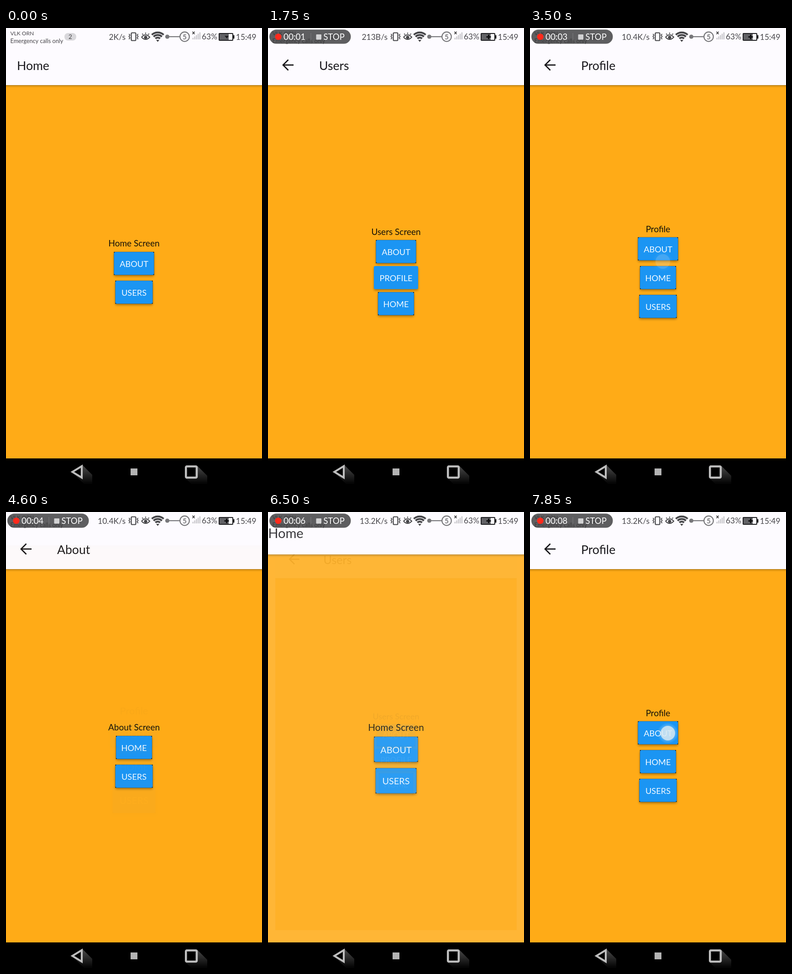
Animation, 561 px wide and 998 px high, one loop 8000 ms. Source, as an HTML page with a canvas:

```html
<!DOCTYPE html>
<html lang="en">
<head>
<meta charset="utf-8">
<title>Stack navigation</title>
<style>
html, body { margin: 0; width: 100%; height: 100%; overflow: hidden; background: #000; }
canvas { display: block; width: 561px; height: 998px; }
</style>
</head>
<body>
<canvas id="stage" width="561" height="998"></canvas>
<script>
const W = 561, H = 998, NAV = 942, LOOP = 8000;
const CX = 280.5, CY = 471.5;
const FONT = 'Lato, "Open Sans", sans-serif';
const ctx = document.getElementById('stage').getContext('2d');
const layerCanvas = document.createElement('canvas');
layerCanvas.width = W;
layerCanvas.height = NAV;
const layer = layerCanvas.getContext('2d');

// Buttons: label, top, width, plain corners
const SCREENS = {
  Home: { back: false, text: 'Home Screen', y: 472, buttons: [['ABOUT', 490, 88], ['USERS', 553, 82]] },
  Users: { back: true, text: 'Users Screen', y: 447, buttons: [['ABOUT', 464, 88], ['PROFILE', 521, 97, true], ['HOME', 578, 79]] },
  Profile: { back: true, text: 'Profile', y: 440.5, buttons: [['ABOUT', 458, 88], ['HOME', 521, 79], ['USERS', 584, 82]] },
  About: { back: true, text: 'About Screen', y: 472, buttons: [['HOME', 490, 79], ['USERS', 553, 82]] }
};

const MOVE = 400;
const MOVES = [
  { at: 630, from: 'Home', to: 'Users' },
  { at: 2208, from: 'Users', to: 'Profile' },
  { at: 4205, from: 'Profile', to: 'About' },
  { at: 5130, from: 'About', to: 'Home', pop: true },
  { at: 6405, from: 'Home', to: 'Users' },
  { at: 7300, from: 'Users', to: 'Profile' }
];

// Touches: start, end, x, y, then optional drag target
const TAPS = [
  [50, 500, 296, 581],
  [1950, 2300, 313, 546],
  [3150, 3530, 302, 486, 291, 511],
  [3950, 4310, 301, 486],
  [4750, 5130, 296, 517],
  [6000, 6410, 296, 581],
  [6950, 7310, 313, 546],
  [7800, 8200, 302, 484]
];

const SECONDS = [950, 1950, 3150, 3950, 4750, 5500, 6800, 7800];
const BLINKS = [1250, 1750, 2300, 2850, 3750, 4250, 5250, 5800, 6800, 7800];
const SPEEDS = [[0, '2K/s'], [300, '213B/s'], [2800, '10.4K/s'], [6000, '13.2K/s']];

const passed = (list, t) => list.filter(v => t >= v).length;

function ease(x) {
  if (x <= 0) return 0;
  if (x >= 1) return 1;
  let lo = 0, hi = 1;
  for (let i = 0; i < 24; i++) {
    const u = (lo + hi) / 2, v = 1 - u;
    if (3 * u * v * v * 0.35 + u * u * u < x) lo = u; else hi = u;
  }
  const v = 1 - lo;
  return 3 * lo * v * v * 0.45 + 3 * lo * lo * v + lo * lo * lo;
}

function text(c, str, x, y, size, color, align = 'left', weight = 400) {
  c.font = `${weight} ${size}px ${FONT}`;
  c.fillStyle = color;
  c.textAlign = align;
  c.fillText(str, x, y);
}

function box(c, x, y, w, h, r, color) {
  c.fillStyle = color;
  c.beginPath();
  c.roundRect(x, y, w, h, r);
  c.fill();
}

function disc(c, x, y, r, color) {
  c.fillStyle = color;
  c.beginPath();
  c.arc(x, y, r, 0, Math.PI * 2);
  c.fill();
}

function line(c, points, width, color, close) {
  c.strokeStyle = color;
  c.lineWidth = width;
  c.beginPath();
  points.forEach(([x, y], i) => i ? c.lineTo(x, y) : c.moveTo(x, y));
  if (close) c.closePath();
  c.stroke();
}

function fillPath(c, points, style) {
  c.fillStyle = style;
  c.beginPath();
  points.forEach(([x, y]) => c.lineTo(x, y));
  c.closePath();
  c.fill();
}

function button(c, [label, y, w, plain]) {
  const x = CX - w / 2, h = 50.5;
  c.save();
  c.shadowColor = 'rgba(70,45,0,.45)';
  c.shadowBlur = 5;
  c.shadowOffsetY = 3;
  box(c, x, y, w, h, 3, '#1b95f3');
  c.restore();
  if (!plain) {
    for (const px of [x, x + w - 2]) {
      for (const py of [y, y + h - 2]) box(c, px, py, 2, 2, 0, '#10283c');
    }
    box(c, x + 0.7, y + 0.7, w - 1.4, h - 1.4, 3, '#1b95f3');
    c.strokeStyle = 'rgba(16,40,60,.3)';
    c.lineWidth = 1;
    c.strokeRect(x, y, w, h);
  }
  text(c, label, CX, y + 32.8, 18.2, '#f4faff', 'center');
}

function drawScreen(c, name) {
  const s = SCREENS[name];
  c.fillStyle = '#ffab17';
  c.fillRect(0, 0, W, NAV);
  const shade = c.createLinearGradient(0, 125, 0, 131);
  shade.addColorStop(0, 'rgba(80,60,20,.5)');
  shade.addColorStop(0.35, 'rgba(100,70,10,.2)');
  shade.addColorStop(1, 'rgba(100,70,10,0)');
  c.fillStyle = shade;
  c.fillRect(0, 125, W, 6);
  c.fillStyle = '#fdfbff';
  c.fillRect(0, 0, W, 125);
  if (s.back) {
    line(c, [[56, 81], [33, 81]], 2.8, '#17161a');
    line(c, [[44.5, 69.5], [33, 81], [44.5, 92.5]], 2.8, '#17161a');
  }
  text(c, name, s.back ? 112 : 24, 92, 26.6, '#1a191d');
  text(c, s.text, CX, s.y + 6.3, 19, '#151208', 'center');
  s.buttons.forEach(b => button(c, b));
}

// Each card keeps a full white backing while its content scales
function showScreen(name, scale, alpha) {
  layer.setTransform(1, 0, 0, 1, 0, 0);
  layer.fillStyle = '#fff';
  layer.fillRect(0, 0, W, NAV);
  layer.translate(CX, CY);
  layer.scale(scale, scale);
  layer.translate(-CX, -CY);
  drawScreen(layer, name);
  ctx.globalAlpha = alpha;
  ctx.drawImage(layerCanvas, 0, 0);
  ctx.globalAlpha = 1;
}

function showScreens(t) {
  ctx.fillStyle = '#fff';
  ctx.fillRect(0, 0, W, NAV);
  const move = MOVES.filter(m => t >= m.at).pop();
  if (!move) return showScreen('Home', 1, 1);
  const x = (t - move.at) / MOVE;
  if (x >= 1) return showScreen(move.to, 1, 1);
  const p = move.pop ? 1 - ease(x) : ease(x);
  const fade = move.pop ? 1 - x : x;
  const under = move.pop ? move.to : move.from;
  const over = move.pop ? move.from : move.to;
  const small = move.pop ? 0.925 : 0.85;
  showScreen(under, 1 + 0.15 * p, 1 - 0.14 * p);
  showScreen(over, small + (1 - small) * p, fade * fade);
}

function showTouch(t) {
  for (const [start, end, x0, y0, x1 = x0, y1 = y0] of TAPS) {
    if (t < start || t >= end) continue;
    const k = Math.min(1, (t - start) / (end - start - 60));
    const x = x0 + (x1 - x0) * k, y = y0 + (y1 - y0) * k;
    ctx.globalAlpha = Math.min(1, (end - t) / 150);
    const halo = ctx.createRadialGradient(x, y, 14, x, y, 23);
    halo.addColorStop(0, 'rgba(190,225,250,.4)');
    halo.addColorStop(1, 'rgba(190,225,250,0)');
    disc(ctx, x, y, 23, halo);
    disc(ctx, x, y, 16, 'rgba(222,234,240,.78)');
    ctx.globalAlpha = 1;
  }
}

function statusIcons(charging) {
  const ink = '#454548', grey = '#77777a';
  // vibrate
  ctx.strokeStyle = ink;
  ctx.lineWidth = 2.2;
  ctx.beginPath();
  ctx.roundRect(274.5, 10.5, 10, 17, 2);
  ctx.stroke();
  for (const [x, d] of [[270.5, 1], [288.5, -1]]) {
    line(ctx, [[x - d, 13], [x + d, 15.5], [x - d, 18.5], [x + d, 21.5], [x - d, 24.5]], 1.8, ink);
  }
  // eye
  ctx.lineWidth = 2;
  ctx.beginPath();
  ctx.moveTo(297, 20);
  ctx.quadraticCurveTo(306, 10, 315, 20);
  ctx.quadraticCurveTo(306, 30, 297, 20);
  ctx.stroke();
  disc(ctx, 306, 20.5, 3.6, ink);
  for (const a of [-2.3, -1.57, -0.84]) {
    const dx = Math.cos(a), dy = Math.sin(a);
    line(ctx, [[306 + dx * 8, 19 + dy * 6], [306 + dx * 11.5, 19 + dy * 9]], 1.8, ink);
  }
  // wifi
  for (const r of [7.5, 13.2, 18.8]) {
    ctx.strokeStyle = ink;
    ctx.lineWidth = 4;
    ctx.beginPath();
    ctx.arc(332.5, 28.5, r, -2.33, -0.81);
    ctx.stroke();
  }
  fillPath(ctx, [[332.5, 30.5], [329, 26], [336, 26]], ink);
  // slider with a ringed digit
  disc(ctx, 353.5, 19, 4.6, grey);
  line(ctx, [[354, 19], [381, 19]], 2.2, grey);
  ctx.lineWidth = 2.2;
  ctx.strokeStyle = grey;
  ctx.beginPath();
  ctx.arc(391.5, 19, 10.3, 0, Math.PI * 2);
  ctx.stroke();
  text(ctx, '5', 391.5, 24.6, 15.5, grey, 'center', 700);
  // signal
  for (let i = 0; i < 5; i++) box(ctx, 408.5 + i * 3.8, 21.5 - i * 3, 2.5, 3.5 + i * 3, 0, '#c9c8cc');
  line(ctx, [[408.5, 8], [413.5, 13.5]], 1.6, '#333');
  line(ctx, [[413.5, 8], [408.5, 13.5]], 1.6, '#333');
  // battery
  box(ctx, 466, 11, 32, 17, 2, '#1c1c1f');
  box(ctx, 498, 15.5, 2.5, 8, 1, '#1c1c1f');
  box(ctx, 468, 13, 28, 13, 0, '#fbfafd');
  box(ctx, 468, 13, 20, 13, 0, '#626266');
  if (charging) {
    box(ctx, 478.5, 18, 10, 3, 0, '#0d0d0f');
    box(ctx, 482, 14.5, 3, 10, 0, '#0d0d0f');
  } else {
    fillPath(ctx, [[479, 17], [488, 17], [484, 23]], '#1c1c1f');
  }
}

function statusBar(t) {
  const ink = '#47464a';
  text(ctx, 'VLK ORN', 9.5, 15.5, 12, ink);
  text(ctx, 'Emergency calls only', 9.5, 33, 12.7, ink);
  box(ctx, 128, 11, 26, 16.5, 8, '#d9d8dc');
  text(ctx, '2', 141, 24, 13.5, ink, 'center');
  text(ctx, SPEEDS.filter(s => t >= s[0]).pop()[1], 262, 25.7, 17.5, ink, 'right');
  statusIcons(t >= 50);
  text(ctx, '63%', 429, 25.3, 17.4, ink);
  text(ctx, '15:49', 548.5, 25.7, 17.4, ink, 'right');
}

function recorder(t) {
  if (t < 50) return;
  box(ctx, 3, 3.5, 178.5, 31, 15.5, 'rgba(56,56,57,.8)');
  if (passed(BLINKS, t) % 2 === 0) disc(ctx, 22.5, 19.3, 7, '#ff2a1c');
  text(ctx, '00:0' + passed(SECONDS, t), 34, 26, 18.8, '#fff');
  box(ctx, 93.5, 11, 1, 17, 0, '#7d7d7f');
  box(ctx, 105.5, 14, 11.5, 11.5, 1, '#d2d2d3');
  text(ctx, 'STOP', 121.5, 26, 18.5, '#fff');
}

function longShadow(points) {
  const g = ctx.createLinearGradient(160, 960, 160, 996);
  g.addColorStop(0, '#454545');
  g.addColorStop(1, '#050505');
  fillPath(ctx, points, g);
}

function navBar() {
  const ink = '#bebebe';
  ctx.fillStyle = '#000';
  ctx.fillRect(0, NAV, W, H - NAV);
  longShadow([[145, 972], [168, 957], [189, 978], [189, 998], [171, 998]]);
  fillPath(ctx, [[145, 971.5], [167, 958], [167, 985]], '#000');
  longShadow([[393, 985], [419, 958], [441, 980], [441, 998], [406, 998]]);
  box(ctx, 394, 959, 24, 25, 2, '#000');
  line(ctx, [[145.5, 971.5], [166, 959], [166, 984]], 4.2, ink, true);
  ctx.strokeStyle = ink;
  ctx.lineWidth = 4.6;
  ctx.beginPath();
  ctx.roundRect(394.3, 959.5, 23.6, 24.5, 2);
  ctx.stroke();
  box(ctx, 273, 964, 15, 15, 0, '#b4b4b4');
}

function frame(now) {
  const t = now % LOOP;
  showScreens(t);
  showTouch(t);
  statusBar(t);
  recorder(t);
  navBar();
}

let begin;
function tick(now) {
  begin ??= now;
  frame(now - begin);
  requestAnimationFrame(tick);
}
frame(0);
requestAnimationFrame(tick);
</script>
</body>
</html>
```
